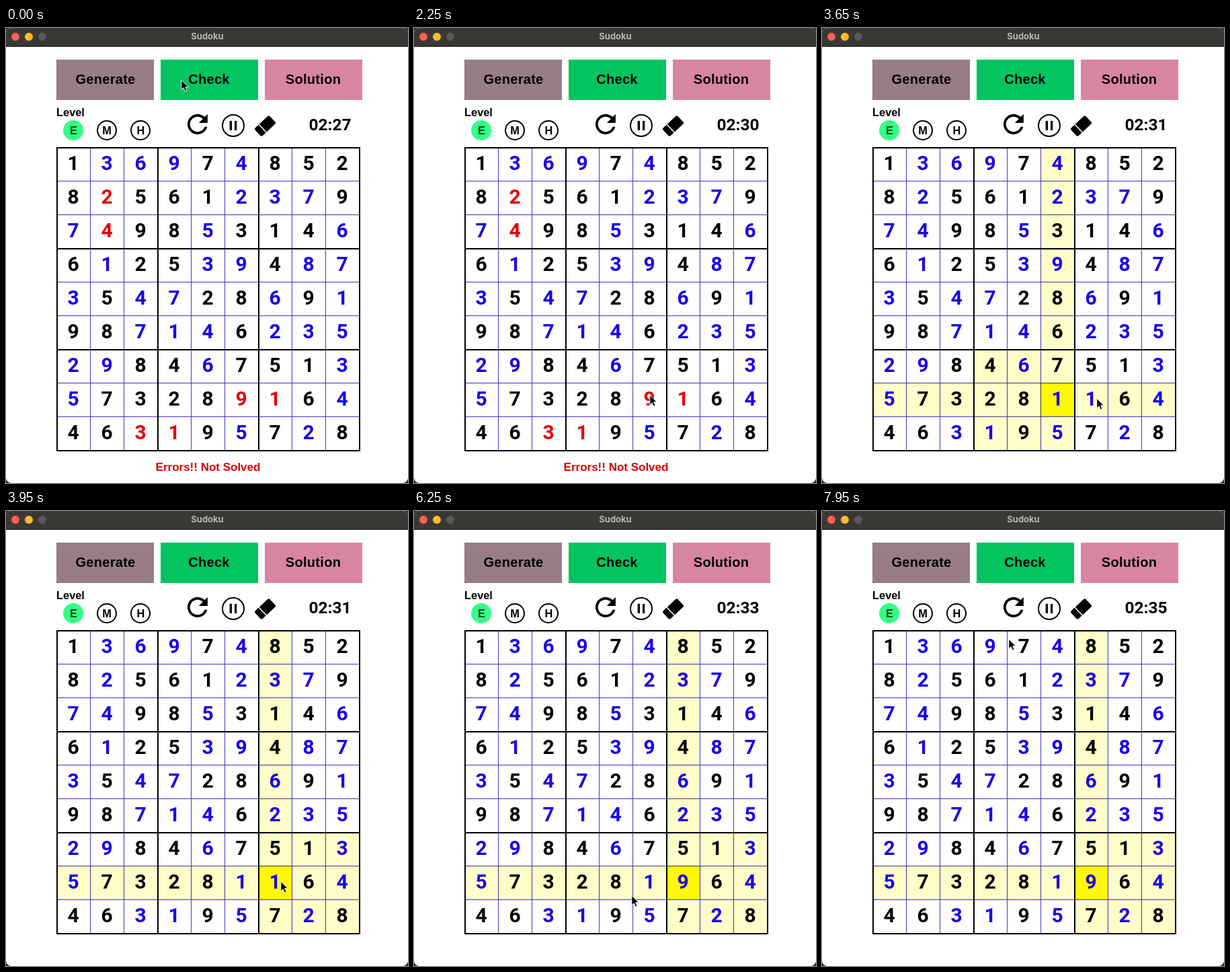
Write an HTML page that moves like this. It is 598x676 px and loops after 8 s.

```html
<!DOCTYPE html>
<html lang="en">
<head>
<meta charset="utf-8">
<title>Sudoku</title>
<style>
  html, body { margin: 0; width: 100%; height: 100%; overflow: hidden; background: #2c2722; }
  svg { display: block; width: 598px; height: 676px; }
  text { font-family: "Liberation Sans", Arial, sans-serif; font-weight: 700; }
  .mid { text-anchor: middle; }
  .label { font-size: 20px; letter-spacing: .3px; }
  .small { font-size: 17px; }
  .level { font-size: 16.4px; }
  .title { font: 700 13px Inter, sans-serif; }
  .digit { font: 700 30px Roboto, "Liberation Sans", sans-serif; }
  .clock { font: 700 24.5px Roboto, "Liberation Sans", sans-serif; }
  #lines { mix-blend-mode: multiply; }
</style>
</head>
<body>
<svg id="stage" viewBox="0 0 598 676">
  <rect width="598" height="676" rx="8" fill="#fff"/>
  <path d="M0 27V8a8 8 0 0 1 8-8H590a8 8 0 0 1 8 8V27z" fill="#3a3835"/>
  <rect y="27" width="598" height="1" fill="#1c1b1a"/>
  <circle cx="14" cy="13" r="6" fill="#fe5f57"/>
  <circle cx="34" cy="13" r="6" fill="#febb2e"/>
  <circle cx="54" cy="13" r="6" fill="#5a5855"/>
  <text class="title mid" x="299.5" y="17" fill="#b7b6b4">Sudoku</text>

  <rect x="75" y="47" width="145" height="60" fill="#967d87"/>
  <rect x="230" y="47" width="145" height="60" fill="#04c45f"/>
  <rect x="385" y="47" width="145" height="60" fill="#d8869f"/>
  <text class="label mid" x="148" y="83">Generate</text>
  <text class="label mid" x="302" y="83">Check</text>
  <text class="label mid" x="457" y="83">Solution</text>

  <text class="level" x="75" y="131">Level</text>
  <circle cx="100" cy="152" r="15" fill="#33ff85"/>
  <g fill="none" stroke="#000" stroke-width="2">
    <circle cx="150" cy="152" r="14"/>
    <circle cx="200" cy="152" r="14"/>
    <circle cx="338" cy="145" r="16"/>
  </g>
  <text class="level mid" x="100.5" y="158" fill="#0b3d22">E</text>
  <text class="level mid" x="150" y="158">M</text>
  <text class="level mid" x="200.3" y="158">H</text>

  <path transform="translate(262.5 120.5) scale(1.87)" d="M17.65 6.35C16.2 4.9 14.21 4 12 4c-4.42 0-8 3.58-8 8s3.58 8 8 8c3.73 0 6.84-2.55 7.73-6h-2.08c-.82 2.33-3.04 4-5.65 4-3.31 0-6-2.69-6-6s2.69-6 6-6c1.66 0 3.14.69 4.22 1.78L13 11h7V4z"/>
  <path d="M332.7 138h3.3v14h-3.3zM340 138h3.3v14h-3.3z"/>
  <g transform="translate(385.5 145.5) rotate(-43)">
    <path d="M-4.5-8H13q2 0 2 2V6q0 2-2 2H-4.5z"/>
    <path d="M-6-8V8H-12.5q-2.5 0-2.5-2.5V-5.5q0-2.5 2.5-2.5z"/>
  </g>
  <text id="clock" class="clock mid" x="482" y="152"></text>

  <g id="shade"></g>
  <g id="lines" fill="none"></g>
  <g id="digits"></g>
  <text id="error" class="small mid" x="300.5" y="658" fill="#d90000">Errors!! Not Solved</text>
  <path id="cursor" d="M.8.3V14.8l3.3-3 2.4 5.3 2.6-1.1-2.4-5.2h4.6z" stroke="#fff" stroke-width="1"/>
</svg>
<script>
const LOOP = 8000, STEP = 50, CELL = 50, LEFT = 75, TOP = 177;
const ROWS = ["136974852", "825612379", "749853146", "612539487", "354728691",
              "987146235", "298467513", "573289164", "463195728"];
// k: given, b: filled in, r: filled in wrongly
const KINDS = ["kbbbkbkkk", "krkkkbbbk", "brkkbkkkb", "kbkkbbkbb", "bkbbkkbkb",
               "kkbbbkbbb", "bbkkbkkkb", "bkkkkrrkb", "kkrrkbkbk"];
const INK = { k: "#000", b: "#1b00e6", r: "#e60005" };
const TICKS = [300, 1300, 2250, 3250, 4300, 5300, 6300, 7300];
const FIRST_PICK = 2400, TYPE_ONE = 3100, SECOND_PICK = 3700, TYPE_NINE = 5400;
const PICK_ROW = 7;

// cursor way points: time, x, y
const PATH = [
  [0, 260, 77], [750, 260, 77], [850, 273, 200], [1000, 303, 414], [1150, 328, 489],
  [1350, 345, 533], [1600, 350, 545], [3150, 350, 545], [3350, 378, 547], [3600, 408, 550],
  [5700, 408, 550], [5900, 385, 556], [6250, 323, 571], [6550, 290, 530], [6650, 290, 530],
  [6900, 280, 470], [7750, 280, 470], [7850, 279, 350], [7950, 277, 190]
];

const $ = id => document.getElementById(id);
function add(parent, tag, attrs) {
  const el = document.createElementNS("http://www.w3.org/2000/svg", tag);
  for (const key in attrs) el.setAttribute(key, attrs[key]);
  return parent.appendChild(el);
}

const cells = [];
for (let r = 0; r < 9; r++) {
  for (let c = 0; c < 9; c++) {
    const x = LEFT + c * CELL, y = TOP + r * CELL;
    const back = add($("shade"), "rect", { x, y, width: CELL, height: CELL });
    const text = add($("digits"), "text", { x: x + 25, y: y + 34.3, class: "digit mid" });
    cells.push({ r, c, back, text });
  }
}

function gridLines(heavy) {
  let d = "";
  for (let i = 0; i < 10; i++) {
    if ((i % 3 === 0) !== heavy) continue;
    const p = i * CELL + (heavy ? 1 : 0.5);
    d += `M${LEFT + p} ${TOP}v452M${LEFT} ${TOP + p}h452`;
  }
  add($("lines"), "path", { d, stroke: heavy ? "#000" : "#4136c8", "stroke-width": heavy ? 2 : 1 });
}
gridLines(false);
gridLines(true);

function cursorAt(t) {
  const i = PATH.findIndex(p => p[0] > t);
  if (i < 0) return PATH[PATH.length - 1].slice(1);
  const [t0, x0, y0] = PATH[i - 1], [t1, x1, y1] = PATH[i];
  const k = (t - t0) / (t1 - t0);
  return [x0 + (x1 - x0) * k, y0 + (y1 - y0) * k];
}

const third = n => Math.floor(n / 3);

function shadeOf(r, c, col) {
  if (col < 0) return "none";
  if (r === PICK_ROW && c === col) return "#fffa00";
  const sameBox = third(r) === third(PICK_ROW) && third(c) === third(col);
  return r === PICK_ROW || c === col || sameBox ? "#fffdc8" : "none";
}

function digitAt(r, c, t) {
  if (r === PICK_ROW && c === 5 && t >= TYPE_ONE) return "1";
  if (r === PICK_ROW && c === 6 && t >= TYPE_NINE) return "9";
  return ROWS[r][c];
}

function draw(t) {
  const col = t < FIRST_PICK ? -1 : t < SECOND_PICK ? 5 : 6;
  for (const { r, c, back, text } of cells) {
    const kind = KINDS[r][c];
    back.setAttribute("fill", shadeOf(r, c, col));
    text.setAttribute("fill", INK[kind === "r" && col >= 0 ? "b" : kind]);
    text.textContent = digitAt(r, c, t);
  }
  $("error").setAttribute("visibility", col < 0 ? "visible" : "hidden");
  $("clock").textContent = "02:" + (27 + TICKS.filter(k => t >= k).length);
  $("cursor").setAttribute("transform", `translate(${cursorAt(t)})`);
}

const start = performance.now();
let shown = -1;
function frame() {
  const t = Math.floor(((performance.now() - start) % LOOP) / STEP) * STEP;
  if (t !== shown) draw(shown = t);
  requestAnimationFrame(frame);
}
frame();
</script>
</body>
</html>
```
